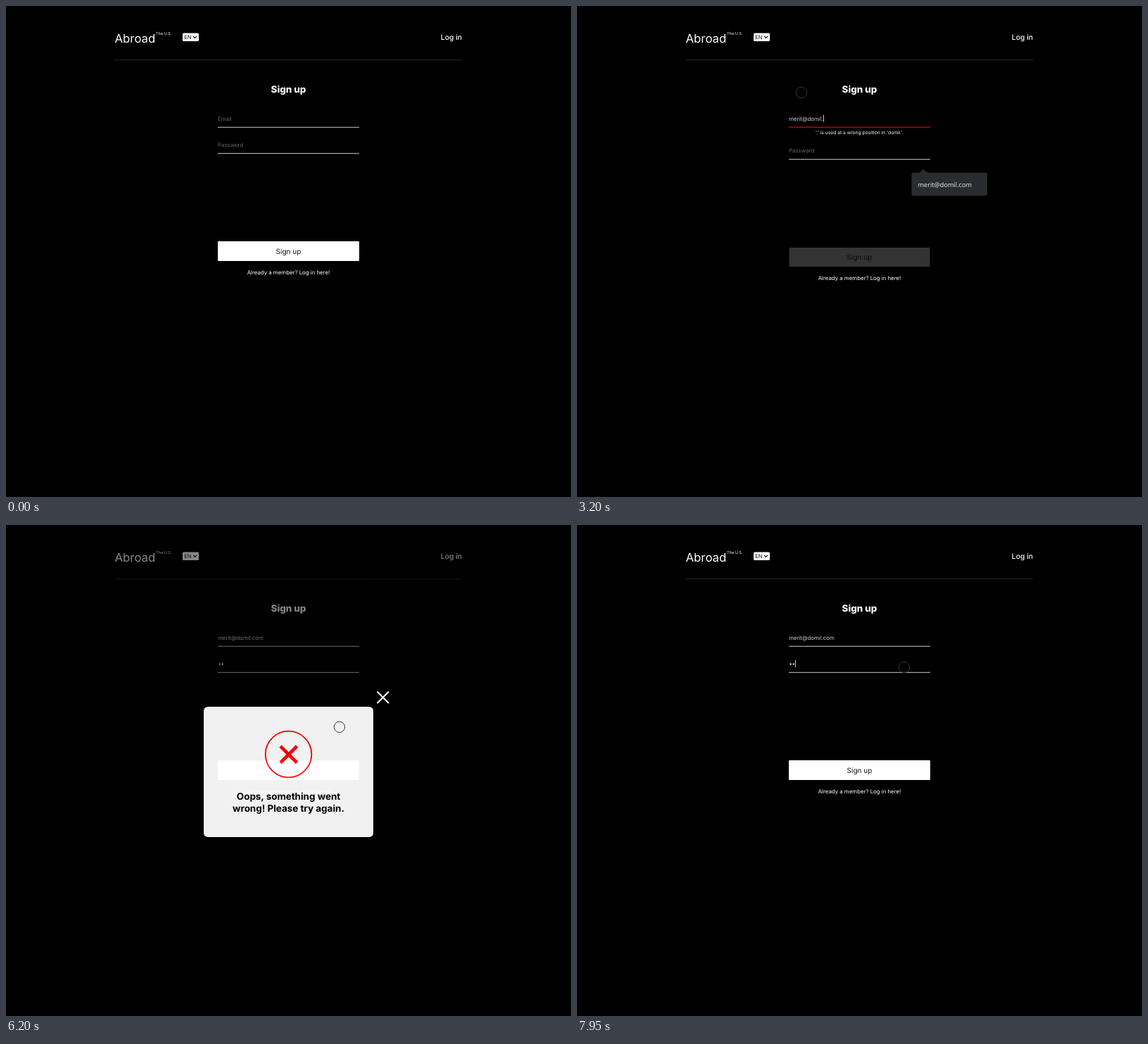
An HTML page for the animation above (8 s loop, 803 by 697 pixels).

```html
<!DOCTYPE html>
<html lang="en">
<head>
<meta charset="utf-8">
<title>Sign up</title>
<style>
  html, body { margin: 0; width: 100%; height: 100%; overflow: hidden; background: #000; }
  svg { display: block; width: 803px; height: 697px; background: #000; }
  text { font-family: Inter, sans-serif; font-size: 7.84px; fill: #fff; text-rendering: geometricPrecision; white-space: pre; }
  .mid { text-anchor: middle; }
  .input { fill: #ccc; }
  .hint { fill: #656565; }
  .error { font-size: 6.72px; }
  .bold { font-size: 13.44px; font-weight: 700; fill: #000; }
  #list text { font-family: "Open Sans", sans-serif; font-size: 9.2px; fill: #f0f0f0; }
</style>
</head>
<body>
<svg viewBox="0 0 803 697">
  <defs>
    <radialGradient id="blob">
      <stop offset="0" stop-color="#4c5052" stop-opacity=".68"/>
      <stop offset=".7" stop-color="#4c5052" stop-opacity=".6"/>
      <stop offset="1" stop-color="#4c5052" stop-opacity="0"/>
    </radialGradient>
  </defs>

  <g id="header">
    <text x="154.5" y="51.8" style="font-size:16.8px">Abroad</text>
    <text x="213" y="41" style="font-size:5.6px">The U.S.</text>
    <rect x="251" y="38.5" width="23" height="11.5" rx="1.5" fill="#fff"/>
    <text x="253.2" y="47" style="font-size:7.6px;fill:#111">EN</text>
    <path d="M266.3 43l2.3 2.3 2.3-2.3" fill="none" stroke="#111" stroke-width="1.2"/>
    <text x="648" y="47.8" text-anchor="end" style="font-size:10.4px;font-weight:500">Log in</text>
    <rect x="155" y="76" width="493" height="1" fill="#242424"/>
  </g>

  <text class="mid" x="401.5" y="123" style="font-size:13.44px;font-weight:800">Sign up</text>

  <text id="email" x="301" y="162.6"></text>
  <rect id="emailLine" x="301" width="201"/>
  <g id="emailError"></g>

  <g id="passRow">
    <text id="passHint" class="hint" x="301" y="199.7">Password</text>
    <circle id="dot1" cx="303.7" cy="197.5" r="1.3" fill="#ccc"/>
    <circle id="dot2" cx="307.8" cy="197.5" r="1.3" fill="#ccc"/>
    <rect id="passLine" x="301" width="201"/>
    <g id="passError"></g>
  </g>
  <rect id="caret" width="1" height="10" fill="#ccc"/>

  <g id="actions">
    <rect id="button" rx="1"/>
    <text id="buttonText" class="mid" x="401.5" y="351.7" style="font-size:10.08px">Sign up</text>
    <text class="mid" x="401.5" y="380.8">Already a member? Log in here!</text>
  </g>

  <g id="list">
    <path d="M486 237.5l6.4-6 6.4 6z" fill="#2a2b2e"/>
    <rect id="listBox" x="475.5" y="236.5" rx="3" fill="#2a2b2e"/>
    <g id="listRows"></g>
  </g>

  <g id="modal">
    <rect width="803" height="697" fill="#000" fill-opacity=".5"/>
    <path d="M527.5 236.5l16.5 16.5M544 236.5l-16.5 16.5" stroke="#fff" stroke-width="2.2"/>
    <rect x="281" y="258" width="241" height="185" rx="5.6" fill="#fff"/>
    <circle cx="401.5" cy="325.5" r="32.8" fill="none" stroke="#f00" stroke-width="1.8"/>
    <path d="M390 314l23.5 23.5M413.5 314l-23.5 23.5" stroke="#f00" stroke-width="4.6"/>
    <text class="bold mid" x="401.5" y="390.2">Oops, something went</text>
    <text class="bold mid" x="401.5" y="406.5">wrong! Please try again.</text>
  </g>

  <g id="cursor">
    <circle id="ring" r="7.7" fill="none" stroke="#333"/>
    <circle id="press" r="9" fill="url(#blob)"/>
  </g>
</svg>

<script>
const LOOP = 8000, LINE = 8.4, MAIL = "merit@domil.com";
const OTHERS = ["merit.work@domil.com", "merit.news@domil.com", "merit.shop@domil.com", "merit.archive@domil.com"];

// times at which each next character appears
const MAIL_KEYS = [1400, 1700, 1800, 1900, 2000, 2300, 2550, 2700, 2800, 2900, 3050, 3200, 3400, 3550, 3600];
const PASS_KEYS = [4950, 5100];
// time, x, y
const PATH = [
  [350, 281, 42], [750, 318, 156], [900, 318, 156], [1100, 319, 123],
  [3950, 319, 123], [4150, 346.5, 154.5], [4650, 349, 194],
  [5150, 349, 194], [5600, 392, 343], [5900, 392, 343],
  [6450, 535.5, 244.5], [7100, 535.5, 244.5], [7500, 465, 202]
];
const CLICKS = [[800, 920], [4700, 4820], [5650, 5880], [6450, 6720], [7520, 7640]];
// focused field: start, end, field
const FOCUS = [[850, 4750, "mail"], [4750, 5700, "pass"], [7650, 8000, "pass"]];

const $ = id => document.getElementById(id);
const set = (id, attrs) => { for (const k in attrs) $(id).setAttribute(k, attrs[k]); };
const show = (id, on) => set(id, { visibility: on ? "visible" : "hidden" });
const clamp = v => Math.min(1, Math.max(0, v));
const ramp = (t, a, b) => clamp((t - a) / (b - a));
const ease = v => v * v * (3 - 2 * v);
const shift = (id, y) => set(id, { transform: `translate(0 ${y})` });

function addText(parent, str, x, y, cls = "") {
  const el = document.createElementNS("http://www.w3.org/2000/svg", "text");
  el.setAttribute("x", x);
  el.setAttribute("y", y);
  el.setAttribute("class", cls);
  el.textContent = str;
  parent.append(el);
}

function mailError(s) {
  if (!s) return [];
  if (!s.includes("@")) return [`Please include an '@' in the email address. '${s}' is missing an`, "'@'."];
  if (s.endsWith("@")) return [`Please enter a part following '@'. '${s}' is incomplete.`];
  if (s.endsWith(".")) return [`'.' is used at a wrong position in '${s.split("@")[1]}'.`];
  return [];
}

const passError = n => n === 1
  ? ["Please lengthen this text to 2 characters or more (you are", "currently using 1 character)."]
  : [];

function drawError(id, lines, y) {
  const key = lines.join("|"), g = $(id);
  if (g.dataset.key === key) return;
  g.dataset.key = key;
  g.replaceChildren();
  const one = lines.length === 1;
  lines.forEach((s, i) => addText(g, s, one ? 401.5 : 301, y + i * 8.2, one ? "error mid" : "error"));
}

const drawLine = (id, y, bad) =>
  set(id, bad ? { y: y - .3, height: 1.4, fill: "#c80000" } : { y, height: 1, fill: "#ccc" });

function drawList(t) {
  const on = t >= 900 && t < 3700, full = t < 1550;
  show("list", on);
  if (!on) return;
  set("listBox", { width: full ? 144.5 : 107.5, height: full ? 168 : 33 });
  const g = $("listRows"), count = full ? 5 : 1;
  if (g.childElementCount === count) return;
  g.replaceChildren();
  [MAIL, ...OTHERS].slice(0, count).forEach((s, i) => addText(g, s, 484.5, 257 + i * 32.5));
}

function drawCaret(t, typed, chars) {
  const f = FOCUS.find(([a, b]) => t >= a && t < b);
  if (!f) return show("caret", false);
  const mail = f[2] === "mail";
  const last = Math.max(f[0], ...(mail ? MAIL_KEYS : PASS_KEYS).filter(k => k <= t));
  show("caret", (t - last) % 1000 < 500);
  const x = mail
    ? 301.2 + (typed ? $("email").getComputedTextLength() : 0)
    : 301.2 + chars * 4.2;
  set("caret", { x: Math.round(x), y: mail ? 154.5 : 191.8 });
}

function drawCursor(t) {
  show("cursor", t >= 350);
  let i = PATH.findIndex(p => p[0] > t);
  if (i < 0) i = PATH.length;
  const a = PATH[Math.max(0, i - 1)], b = PATH[Math.min(i, PATH.length - 1)];
  const k = a === b ? 0 : ease(ramp(t, a[0], b[0]));
  set("cursor", { transform: `translate(${a[1] + (b[1] - a[1]) * k} ${a[2] + (b[2] - a[2]) * k})` });
  const press = Math.max(...CLICKS.map(([s, e]) => Math.min(ramp(t, s, s + 50), 1 - ramp(t, e - 60, e))));
  set("press", { opacity: press });
  set("ring", { opacity: 1 - press });
}

function drawButton(t) {
  const off = t >= MAIL_KEYS[0] && t < PASS_KEYS[1];
  const hover = ramp(t, 5530, 5700) * (1 - ramp(t, 5950, 6150));
  const mix = to => Math.round(255 + (to - 255) * hover);
  set("button", off
    ? { x: 301.5, y: 334.5, width: 200, height: 27, fill: "#333" }
    : { x: 301, y: 334, width: 201, height: 28, fill: `rgb(${mix(180)},${mix(205)},${mix(217)})` });
  $("buttonText").style.fill = off ? "#0c0c0c" : "#161616";
}

function render(t) {
  const typed = MAIL.slice(0, MAIL_KEYS.filter(k => k <= t).length);
  const chars = PASS_KEYS.filter(k => k <= t).length;
  const bad1 = mailError(typed), bad2 = passError(chars);

  $("email").textContent = typed || "Email";
  set("email", { class: typed ? "input" : "hint" });
  drawLine("emailLine", 171.7, bad1.length);
  drawError("emailError", bad1, 182);

  show("passHint", !chars);
  show("dot1", chars > 0);
  show("dot2", chars > 1);
  drawLine("passLine", 208.8, bad2.length);
  drawError("passError", bad2, 219);

  shift("passRow", bad1.length * LINE);
  shift("actions", (bad1.length + bad2.length) * LINE);

  drawButton(t);
  drawList(t);
  drawCaret(t, typed, chars);
  const fade = ease(ramp(t, 5900, 6250)) * (1 - ease(ramp(t, 7080, 7420)));
  set("modal", { opacity: fade });
  show("modal", fade > 0);
  drawCursor(t);
}

const start = performance.now();
function tick() {
  render((performance.now() - start) % LOOP);
  requestAnimationFrame(tick);
}
tick();
</script>
</body>
</html>
```
